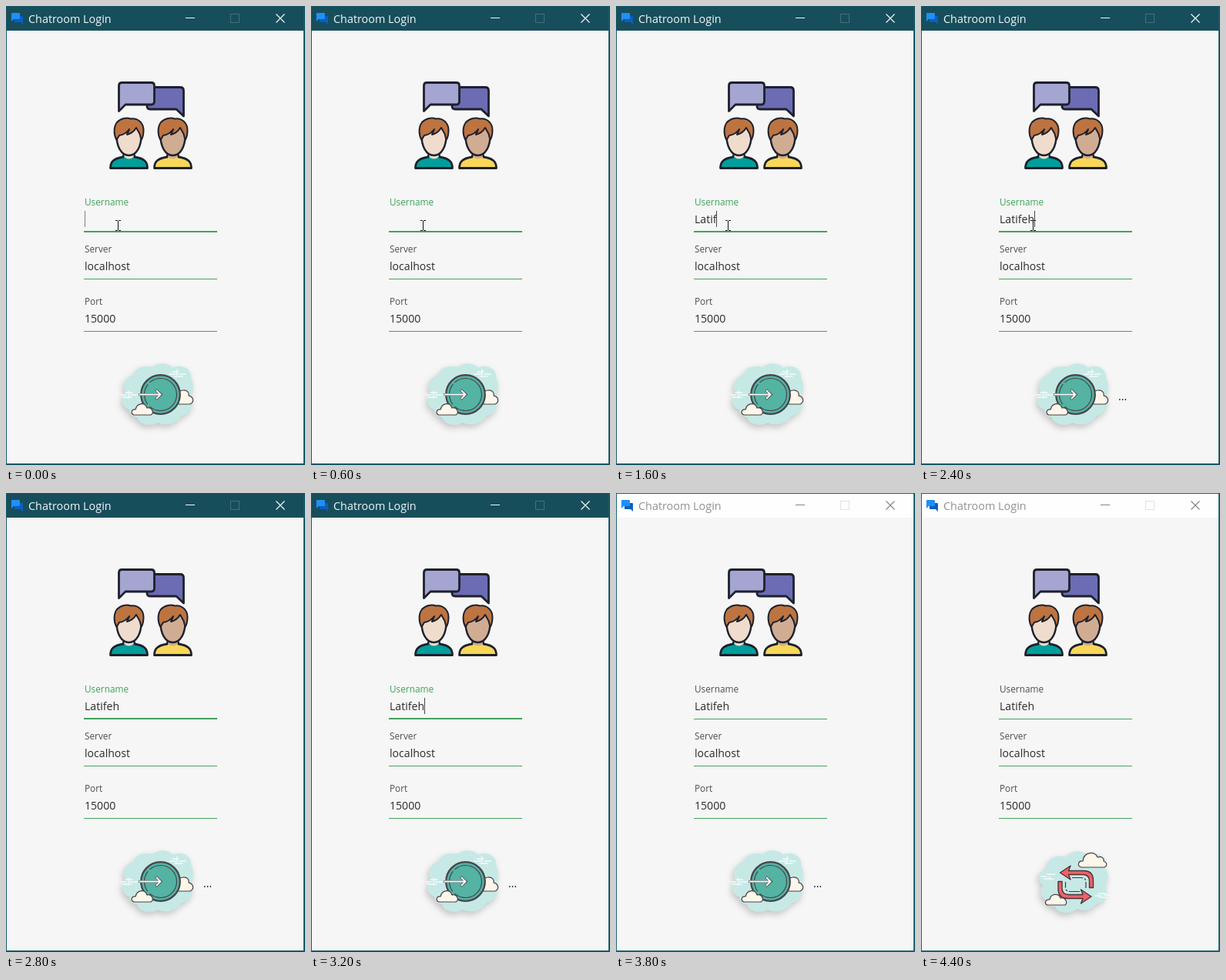
These frames come from a looping animation (388x596 px, 5.2 s). An HTML page:

```html
<!DOCTYPE html>
<html lang="en">
<head>
<meta charset="utf-8">
<title>Chatroom Login</title>
<style>
  html, body { margin: 0; width: 100%; height: 100%; overflow: hidden; }
  svg { display: block; width: 388px; height: 596px; }
  text { font: 14.1px "Open Sans", "Noto Sans", sans-serif; fill: #2b2b2b; }
  text.label { font-size: 11.8px; fill: #4c514d; }
  .cloud { fill: #c6e9e6; filter: drop-shadow(-2px 4px 4px #0003); }
  .puff { fill: #fdf6ea; stroke: #4b4045; stroke-width: 1.2; stroke-linejoin: round; }
  .wind { fill: none; stroke: #f4fcfb; stroke-width: 1.3; stroke-linecap: round; }
  .red { fill: #ee6267; stroke: #4b3338; stroke-width: 1.4; stroke-linejoin: round; }
  .ink { stroke: #1e202d; stroke-width: 2.8; stroke-linejoin: round; stroke-linecap: round; }

  #win { --bar: #174e5c; --edge: #185867; --title: #f3f7f8; --btn: #f4f8f9; --max: #44707c; --focus: #3fa15b; }
  #win.idle { --bar: #fefefe; --edge: #1b6373; --title: #929292; --btn: #858585; --max: #e2e2e2; --focus: #4c514d; }
  #title { font-size: 14.4px; fill: var(--title); }
  #name-label { fill: var(--focus); }
</style>
</head>
<body>
<svg id="win" viewBox="0 0 388 596">
  <defs>
    <g id="person" class="ink">
      <path d="M135.500 210.500C135.500 202 140 198 152 196L154 189H165L167 196C179 198 183.500 202 183.500 210.500Z"/>
      <path fill="var(--skin)" stroke="none" d="M153.500 186H165.500V196Q159.500 201 153.500 196Z"/>
      <path fill="var(--skin)" stroke-width="2.400" d="M143.500 166C143 183 150 194 159.500 194C169 194 176 183 175.500 166L170 154H149Z"/>
      <path fill="#bd7441" stroke-width="2" d="M143.500 174C139.500 167 139.500 157 144 151C149 145.500 157 144.500 162 146.500C171 145 178.500 152 178.500 161C178.500 167 178 170 175.500 174L173.500 166L169 158Q165 165 157 167L160 160Q155 167 147 168Z"/>
    </g>
  </defs>

  <rect width="388" height="596" fill="var(--edge)"/>
  <rect x="1" y="1" width="385" height="593" fill="#f5f6f5"/>
  <rect x="1" y="1" width="385" height="31" fill="var(--bar)"/>
  <path fill="#0b5fc4" d="M12 13H21Q22 13 22 14V24L19 21H12Q11 21 11 20V14Q11 13 12 13Z"/>
  <path fill="#1f90f8" d="M8 9H17Q18 9 18 10V16Q18 17 17 17H10L7 20V10Q7 9 8 9Z"/>
  <text id="title" x="29" y="22">Chatroom Login</text>
  <path fill="none" stroke="var(--btn)" stroke-width="1.200" d="M350.500 10.500L361.500 21.500M361.500 10.500L350.500 21.500"/>
  <rect x="233" y="15" width="12" height="1" fill="var(--btn)"/>
  <rect x="291.500" y="10.500" width="11" height="11" fill="none" stroke="var(--max)"/>

  <path class="ink" fill="#6c6cb5" d="M187 105.500H226Q230.500 105.500 230.500 110V143L221 134H187Q183 134 183 130V109.500Q183 105.500 187 105.500Z"/>
  <path class="ink" fill="#a4a5d0" d="M150.500 99.500H188.500Q192.500 99.500 192.500 103.500V123.500Q192.500 128 188.500 128H155L146.500 136.500V103.500Q146.500 99.500 150.500 99.500Z"/>
  <use href="#person" fill="#009e9a" style="--skin:#efdccd"/>
  <use href="#person" x="57" fill="#f8d758" style="--skin:#d0ad92"/>

  <text id="name-label" class="label" x="102" y="259">Username</text>
  <text class="label" x="102" y="320">Server</text>
  <text class="label" x="102" y="388">Port</text>
  <text id="name" x="102" y="282"></text>
  <text x="102" y="343">localhost</text>
  <text x="102" y="411">15000</text>
  <g fill="#43a25d">
    <rect x="101" y="293" width="173" height="1"/>
    <rect id="underline" x="101" y="292" width="173" height="2"/>
    <rect x="101" y="354" width="173" height="1"/>
    <rect x="101" y="422" width="173" height="1"/>
  </g>
  <rect id="caret" y="266" width="1" height="21" fill="#333"/>
  <path id="mouse" fill="none" stroke="#111" d="M142 278.500H144.500L145.500 279.500L146.500 278.500H149M145.500 279V291M142 291.500H144.500L145.500 290.500L146.500 291.500H149"/>

  <g id="login">
    <path class="cloud" d="M160 524C150 521 148 508 156 503C149 492 156 480 166 479C168 468 182 466 190 469C197 462 212 463 217 470C226 464 242 470 240 483C245 492 243 500 240 505C246 517 240 530 228 532C221 543 207 546 197 541C186 547 172 543 170 534C163 533 160 529 160 524Z"/>
    <path class="wind" d="M212 478H222M216 475H224M225 478H233M222 472V479M219 481H229"/>
    <path class="puff" d="M224 517C220 511 221 500 229 499C235 498 238 502 237 506C243 507 245 514 239 517Z"/>
    <circle cx="200.500" cy="504.500" r="25.300" fill="#54b3a3" stroke="#48434a" stroke-width="2.200"/>
    <circle cx="200.500" cy="504.500" r="21" fill="none" stroke="#48434a" stroke-width="1.200" stroke-dasharray="48 4 28 3"/>
    <path class="wind" d="M149 505H156M151 508H163M155 502H164M161 505H170M159 500V509"/>
    <path fill="none" stroke="#48434a" stroke-width="3.200" d="M172 504.500H200M194.500 498.500L201 504.500L194.500 510.500"/>
    <path fill="none" stroke="#fff" stroke-width="2" d="M172.500 504.500H200M195 499L200.500 504.500L195 510"/>
    <path class="puff" d="M166 531C161 529 163 523 168 524C170 515 181 514 183 522C189 520 193 528 188 531Z"/>
  </g>

  <g id="reload">
    <path class="cloud" d="M162 528C153 523 154 514 159 510C149 503 152 490 163 488C163 474 177 468 188 473C195 463 211 463 217 471C230 464 242 474 238 486C245 493 244 505 238 509C245 519 239 532 228 533C222 542 211 544 203 540C192 549 176 545 174 537C167 538 162 534 162 528Z"/>
    <path class="wind" d="M156 498H163M160 501H172M164 495H174M167 498V501M226 523H234M230 520H240M231 525H241M237 522H247"/>
    <path class="puff" d="M208 486C202 484 204 477 210 478C211 466 226 464 229 473C235 471 238 475 237 478C243 480 241 486 237 486Z"/>
    <path id="turn" class="red" d="M180.500 493L194 484L191.500 490.500H211Q223.500 490.500 223.500 503V512.500H218.500V504Q218.500 495.500 210 495.500H191.500L194 502Z"/>
    <use href="#turn" transform="rotate(180 200.750 508.500)"/>
    <path fill="none" stroke="#4b3338" stroke-width="1.200" stroke-dasharray="14 2 3 2" d="M196 499.500H208Q214 500 214 505V513M206 517.500H193Q187.500 517 187.500 512V505"/>
    <path class="puff" d="M164 535C159 533 162 527 167 528C168 520 179 519 181 526C187 524 191 532 187 535Z"/>
  </g>

  <text id="dots" x="256" y="511.500" style="fill:#111">...</text>
</svg>
<script>
  const LOOP = 5200, NAME = "Latifeh";
  const KEYS = [800, 1000, 1200, 1600, 1600, 2000, 2000];   // time of each keystroke
  const get = id => document.getElementById(id);
  const show = (id, on) => get(id).style.visibility = on ? "visible" : "hidden";
  const within = (t, from, to) => t >= from && t < to;

  function draw(t) {
    const focused = t < 3600, loading = t >= 4200;
    get("win").classList.toggle("idle", !focused);
    show("underline", focused);

    const count = KEYS.filter(key => key <= t).length;
    const name = get("name"), caret = get("caret");
    name.textContent = NAME.slice(0, count);
    const width = count ? name.getComputedTextLength() : 0;
    caret.setAttribute("x", Math.round(101.5 + width));
    caret.setAttribute("opacity", t < 600 ? 0.6 : 0.9);
    show("caret", focused && !within(t, 600, 800) && !within(t, 2600, 3200));

    show("mouse", t < 2600);
    show("dots", within(t, 2400, 4200));
    show("login", !loading);
    show("reload", loading);
  }

  const start = performance.now();
  function tick() {
    draw((performance.now() - start) % LOOP);
    requestAnimationFrame(tick);
  }
  tick();
</script>
</body>
</html>
```
